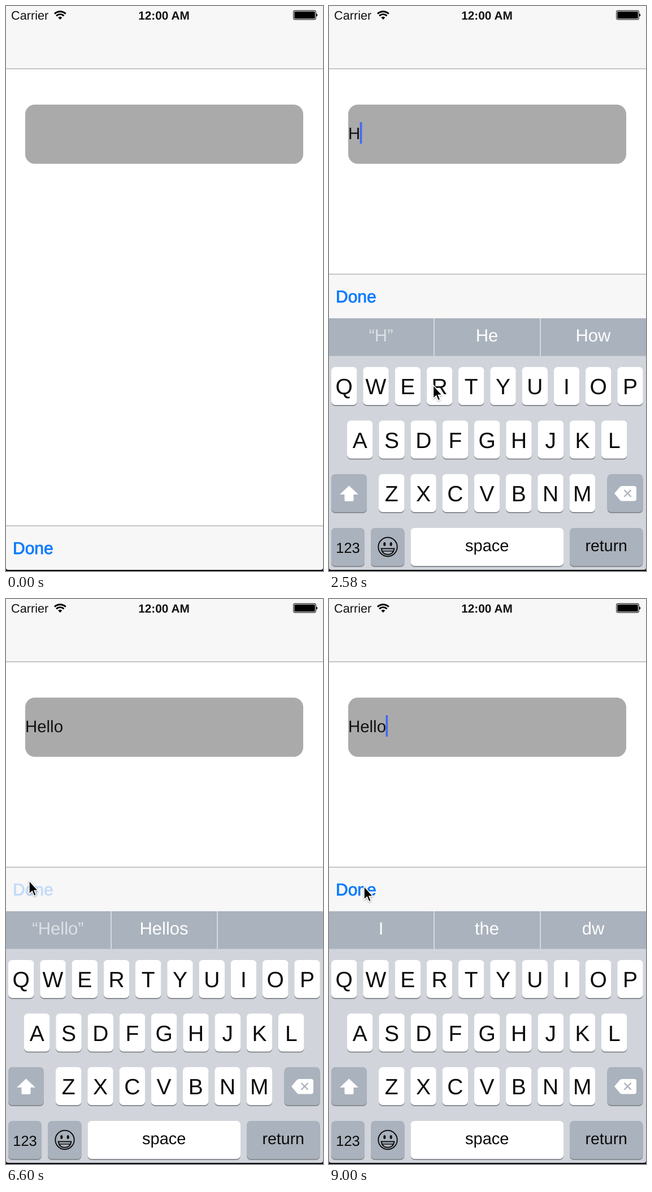
An HTML page for the animation above (9.03 s loop, 561 by 997 pixels).

```html
<!DOCTYPE html>
<html lang="en">
<head>
<meta charset="utf-8">
<title>Text field and keyboard</title>
<style>
html, body { margin: 0; width: 100%; height: 100%; overflow: hidden; background: #fff; }
svg { display: block; width: 561px; height: 997px; }
text { font-family: "Liberation Sans", Arial, sans-serif; text-rendering: geometricPrecision; }
.mid { text-anchor: middle; }
</style>
</head>
<body>
<svg id="stage" viewBox="0 0 561 997">
  <rect width="561" height="997" fill="#fff"/>
  <rect width="561" height="110" fill="#f7f7f7"/>
  <rect y="110" width="561" height="1.4" fill="#b0b0b0"/>
  <text x="9" y="24" font-size="21.7" fill="#111">Carrier</text>
  <g fill="none" stroke="#000" stroke-width="2.9">
    <path d="M85.9 13.8a14 14 0 0 1 19.8 0M89.2 17.4a9.3 9.3 0 0 1 13.2 0"/>
    <path d="M92.3 20.3a4.8 4.8 0 0 1 7 0l-3.5 3.6z" fill="#000" stroke="none"/>
  </g>
  <text class="mid" x="279.5" y="24" font-size="20.8" font-weight="bold" fill="#111">12:00 AM</text>
  <rect x="508.6" y="8.1" width="39.8" height="15.8" rx="2.8" fill="none" stroke="#222" stroke-width="1.1"/>
  <rect x="510.2" y="9.7" width="36.6" height="12.6" rx="1.6" fill="#000"/>
  <path d="M549.2 13.2q2.2.6 2.2 2.8t-2.2 2.8z" fill="#111"/>

  <rect x="34" y="174" width="492" height="104.5" rx="17" fill="#aaa"/>
  <text id="entry" x="34" y="236" font-size="29.4" fill="#111"></text>
  <rect id="caret" y="205" width="3.6" height="38" fill="#426af0"/>

  <g id="panel">
    <rect y="473" width="561" height="79" fill="#f7f7f7"/>
    <rect y="472.6" width="561" height="1.4" fill="#b0b0b0"/>
    <text id="done" x="12" y="523" font-size="30" fill="#0a7aff" stroke="#0a7aff" stroke-width=".9">Done</text>
    <rect y="551" width="561" height="446" fill="#d1d5db"/>
    <rect y="551" width="561" height="66.5" fill="#aab2bd"/>
    <path d="M186 551v66.5M374 551v66.5" stroke="#d5d9de" stroke-width="2"/>
    <g id="hints" class="mid" font-size="31" fill="#fff">
      <text x="92" y="592"></text><text x="279.5" y="592"></text><text x="467.5" y="592"></text>
    </g>
    <g id="keys" class="mid"></g>
    <path id="shift" d="M35.5 846.5L52 862H43.5V872q0 2-2 2H29.5q-2 0-2-2V862H19z"/>
    <path d="M505 860L515 848.6Q516.5 847 519 847H540q4 0 4 4V869.500q0 4-4 4H519q-2.500 0-4-1.600z" fill="#fff"/>
    <path d="M522.500 854l12 12m0-12l-12 12" stroke="#aab2bd" stroke-width="2.400"/>
    <g fill="none" stroke="#111" stroke-width="2">
      <circle cx="104" cy="954.5" r="16.7"/>
      <path d="M92.500 957.500H115.500Q113.500 968 104 968T92.500 957.500z"/>
      <path d="M94 961.800H114" stroke-width="1.500"/>
      <g fill="#111" stroke="none"><ellipse cx="98.300" cy="949.500" rx="2.100" ry="3.600"/><ellipse cx="109.700" cy="949.500" rx="2.100" ry="3.600"/></g>
    </g>
  </g>
  <path d="M0 991q0 4 4 4H557q4 0 4-4V997H0z" fill="#08080c"/>
  <path id="pointer" d="M0 0V23.500L5.300 18.700 8.800 27 12.400 25.500 9 17.500H15.800z" fill="#000" stroke="#fff" stroke-width="1.500"
        style="filter:drop-shadow(0 1.500px 1.500px rgba(0,0,0,.35))"/>
</svg>
<script>
const LOOP = 9030, DROP = 444, OPEN = 600, CLOSE = 6690, REOPEN = 7980;
const $ = id => document.getElementById(id);
const [entry, caret, panel, done, hints, keys, shift, pointer] =
  ['entry', 'caret', 'panel', 'done', 'hints', 'keys', 'shift', 'pointer'].map($);

function add(tag, attrs, text = '') {
  const el = document.createElementNS('http://www.w3.org/2000/svg', tag);
  for (const k in attrs) el.setAttribute(k, attrs[k]);
  el.textContent = text;
  keys.append(el);
  return el;
}

function key(x, y, w, fill = '#fff', label = '', size = 39, base = 48) {
  add('rect', { x, y: y + 2, width: w, height: 67, rx: 7, fill: '#898d93' });
  const face = add('rect', { x, y, width: w, height: 67, rx: 7, fill });
  add('text', { x: x + w / 2, y: y + base, 'font-size': size, fill: '#0b0b0b' }, label);
  return face;
}

const GREY = '#aab2bd';
[['QWERTYUIOP', 4, 637], ['ASDFGHJKL', 32, 731.5], ['ZXCVBNM', 88, 826]].forEach(([row, x, y]) =>
  [...row].forEach((c, i) => key(x + i * 56.25, y, 45.5, '#fff', c)));
const shiftKey = key(4, 826, 63);
key(492.5, 826, 63, GREY);
key(4, 921, 59, GREY, '123', 25.5, 44);
key(74, 921, 59.5, GREY);
key(144.5, 921, 270.5, '#fff', 'space', 29, 41);
key(426, 921, 129.5, GREY, 'return', 28.5, 41);

// time, field text, suggestions
const typing = [
  [0, '', 'I,The,Dw'],
  [2250, 'H', '“H”,He,How'],
  [3030, 'He', '“He”,Hey,Hello'],
  [3930, 'Hel', '“Hel”,Hello,Help'],
  [4350, 'Hell', '“Hell”,Hello,Hell'],
  [4830, 'Hello', '“Hello”,Hellos,'],
  [REOPEN, 'Hello', 'I,the,dw']
];

// start, end, x, y of each pointer move
const moves = [
  [0, 0, -20, 420],
  [30, 300, 144, 256],
  [1500, 2040, 338, 764],
  [2400, 2640, 157, 652],
  [3360, 3720, 501, 757],
  [4410, 4710, 480, 682],
  [5400, 6360, 41, 497],
  [7500, 7800, 147, 229],
  [8430, 8940, 62, 507]
];

const clamp = v => Math.max(0, Math.min(1, v));
const smooth = v => v * v * (3 - 2 * v);

// critically damped spring, 0 to 1
function spring(ms) {
  const a = Math.max(0, ms) * 0.01826;
  return 1 - (1 + a) * Math.exp(-a);
}

function pointerAt(t) {
  let [, , x, y] = moves[0];
  for (const [start, end, nx, ny] of moves.slice(1)) {
    const p = smooth(clamp((t - start) / (end - start)));
    x += (nx - x) * p;
    y += (ny - y) * p;
  }
  return `translate(${x.toFixed(2)} ${y.toFixed(2)})`;
}

let shown;
function showTyping(step) {
  if (step === shown) return;
  shown = step;
  entry.textContent = step[1];
  step[2].split(',').forEach((word, i) => {
    hints.children[i].textContent = word;
    hints.children[i].setAttribute('fill-opacity', word[0] === '“' ? 0.6 : 1);
  });
  caret.setAttribute('x', 34 + (step[1] ? entry.getComputedTextLength() - 0.5 : 0));
  const upper = !step[1];
  shiftKey.setAttribute('fill', upper ? '#fff' : GREY);
  shift.setAttribute('fill', upper ? '#000' : '#fff');
}

function render(t) {
  const step = typing.filter(s => s[0] <= t).pop();
  showTyping(step);

  const editing = t >= OPEN && t < CLOSE || t >= REOPEN;
  entry.setAttribute('y', editing ? 235 : 236);
  const since = t - Math.max(step[0], OPEN);
  caret.setAttribute('visibility', editing && since % 1000 < 500 ? 'visible' : 'hidden');

  const up = t < CLOSE ? spring(t - OPEN)
    : t < REOPEN ? 1 - spring(t - CLOSE)
    : spring(t - REOPEN);
  panel.setAttribute('transform', `translate(0 ${(DROP * (1 - up)).toFixed(2)})`);

  const pressed = t >= 6570 && t < CLOSE;
  done.setAttribute('opacity', pressed ? 0.22 : t < CLOSE ? 1 : 0.22 + 0.78 * clamp((t - CLOSE) / 300));
  pointer.setAttribute('transform', pointerAt(t));
}

const begin = performance.now();
function tick() {
  render((performance.now() - begin) % LOOP);
  requestAnimationFrame(tick);
}
tick();
</script>
</body>
</html>
```
